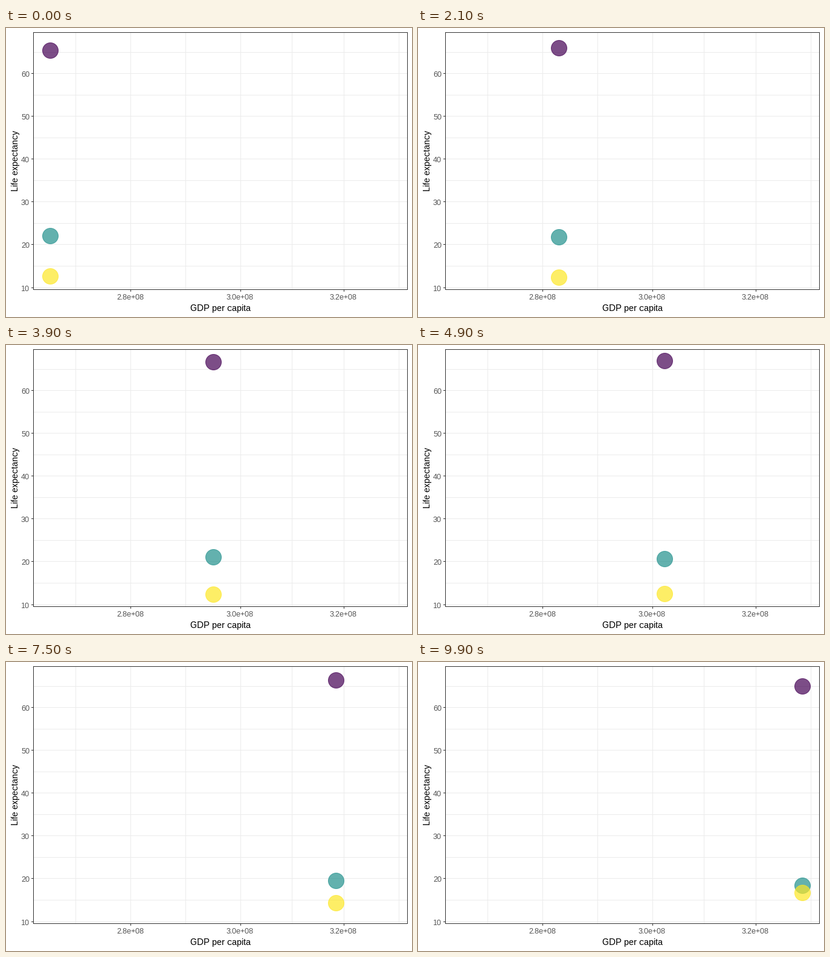
Recreate the animation shown at these times as a matplotlib script. Size 672x480 px, loop 10 s.

```python
import matplotlib.pyplot as plt
import numpy as np
from matplotlib.animation import FuncAnimation
from matplotlib.patches import Circle, Rectangle

W, H, DPI = 672, 480, 96
PX = 72 / DPI  # one pixel in points
FRAMES = 100
LEFT, TOP, RIGHT, BOTTOM = 45, 7, 664, 434
GRID, BORDER, LABEL = "#EBEBEB", "#333333", "#4D4D4D"

plt.rcParams.update({
    "font.family": "Liberation Sans",
    "text.hinting": "native",
    "text.hinting_factor": 1,
    "toolbar": "None",
})

fig = plt.figure(figsize=(W / DPI, H / DPI), dpi=DPI, facecolor="white")
ax = fig.add_axes([0, 0, 1, 1])
ax.set(xlim=(0, W), ylim=(H, 0))
ax.axis("off")


def box(x, y, w, h, color, z):
    ax.add_patch(Rectangle((x, y), w, h, fc=color, lw=0, snap=False, zorder=z))


def label(x, y, text, size, color, ha="center", rotation=0):
    ax.text(x, y, text, fontsize=size * PX, color=color, ha=ha, va="baseline",
            rotation=rotation, rotation_mode="anchor", zorder=5)


def x_of(v):
    """Logarithmic x scale, v in units of 1e8."""
    return 206.3 + 6087 * np.log10(v / 2.8)


def y_of(v):
    return 75.59 + 7.11 * (60 - v)


# grid
x_values, y_values = np.array([2.8, 3.0, 3.2]), range(10, 61, 10)
major = x_of(x_values)
half = (major[1] - major[0]) / 2
minor = [major[0] - half, *(major[:-1] + major[1:]) / 2, major[-1] + half]
for x in np.floor([*major, *minor]):
    box(x, TOP, 1, BOTTOM - TOP, GRID, 1)
for v in range(10, 66, 5):
    box(LEFT, np.floor(y_of(v)), RIGHT - LEFT, 1, GRID, 1)

# panel border
for y in (TOP, BOTTOM):
    box(LEFT, y, RIGHT - LEFT + 1, 1, BORDER, 4)
for x in (LEFT, RIGHT):
    box(x, TOP, 1, BOTTOM - TOP + 1, BORDER, 4)

# ticks and labels
for v, x in zip(x_values, np.floor(major)):
    box(x, BOTTOM + 1, 1, 3, BORDER, 4)
    label(x - 0.5, 451, f"{v:.1f}e+08", 12, LABEL)
for v in y_values:
    y = np.floor(y_of(v))
    box(LEFT - 3, y, 3, 1, BORDER, 4)
    label(39, y + 6, str(v), 12, LABEL, ha="right")

label(355, 470, "GDP per capita", 14.67, "black")
label(20, 220.5, "Life expectancy", 14.67, "black", rotation=90)


def smooth(*points):
    """Cubic Hermite curve through (time, value) points, one value per frame."""
    t, v = np.array(points, float).T
    slope = np.gradient(v, t)
    f = np.arange(FRAMES)
    i = np.clip(np.searchsorted(t, f, side="right") - 1, 0, len(t) - 2)
    h = t[i + 1] - t[i]
    s = (f - t[i]) / h
    return ((1 + 2 * s) * (1 - s) ** 2 * v[i] + s * (1 - s) ** 2 * h * slope[i]
            + s ** 2 * (3 - 2 * s) * v[i + 1] - s ** 2 * (1 - s) * h * slope[i + 1])


xs = smooth((0, 73.5), (22, 240.5), (33, 306.5), (44, 374.5),
            (55, 447.5), (77, 555.5), (88, 604.5), (99, 636.5))
upper = smooth((0, 37.5), (11, 36.5), (33, 29.4), (52, 26.4), (77, 31.3), (99, 40.3))
lower = smooth((0, 412.5), (29, 414.5), (49, 413.5), (66, 406.3), (88, 391.5), (99, 383.5))
middle = 795.3 - upper - lower  # the three shares add up to 100 %

tracks = [upper, middle, lower]
dots = [ax.add_patch(Circle((0, 0), 13, fc=c, ec=c, lw=PX, alpha=0.7, zorder=3))
        for c in ("#440154", "#21908C", "#FDE725")]


def pixel(v):
    return np.floor(v) + 0.5


def update(k):
    for dot, ys in zip(dots, tracks):
        dot.center = pixel(xs[k]), pixel(ys[k])
    return dots


anim = FuncAnimation(fig, update, frames=FRAMES, interval=100,
                     repeat=True, repeat_delay=0, blit=False)
plt.show()
```
